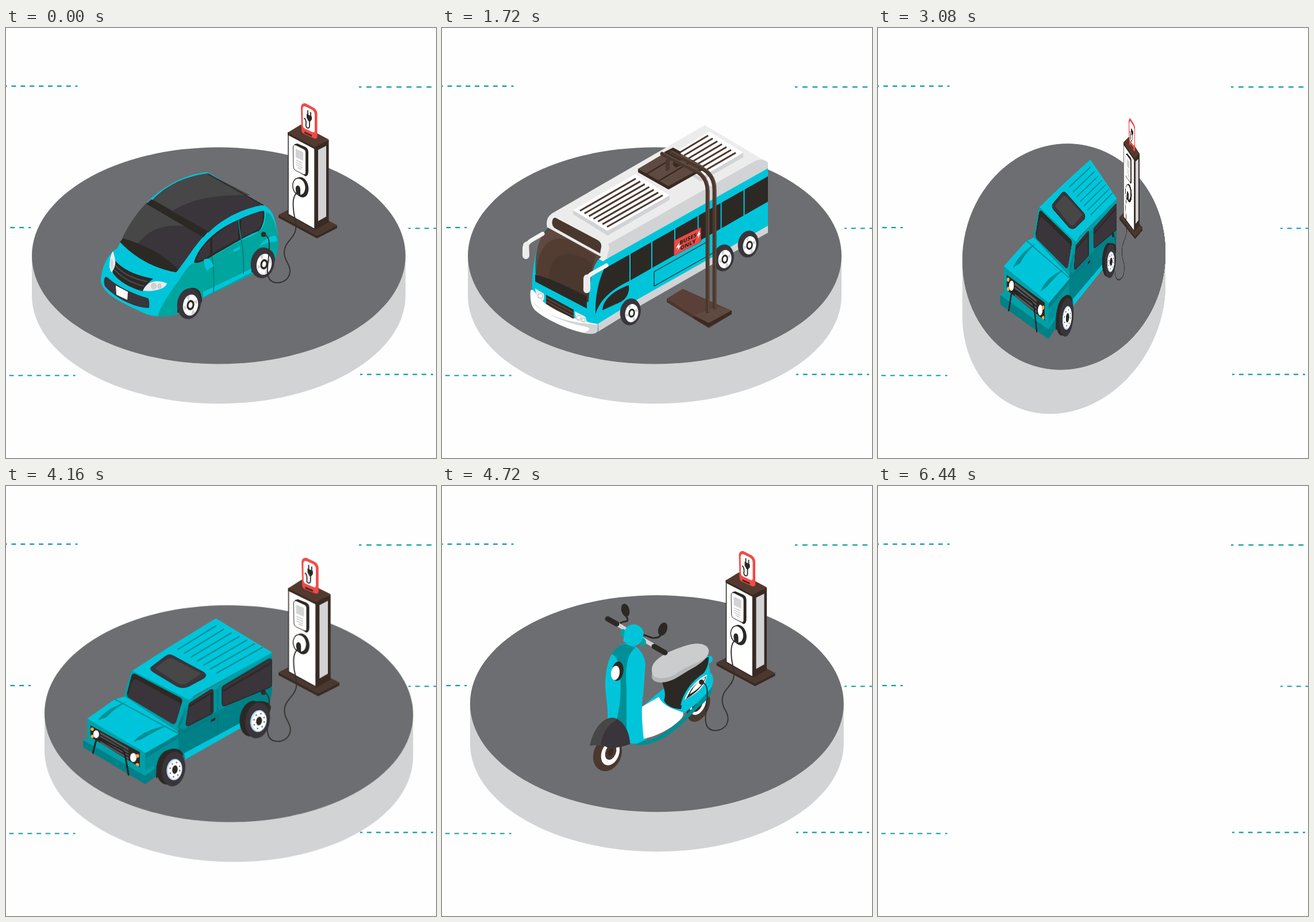
An HTML page for the animation above (6.48 s loop, 748x748 px).

```html
<!DOCTYPE html>
<html lang="en">
<head>
<meta charset="utf-8">
<title>Electric vehicles</title>
<style>
html, body { margin: 0; width: 100%; height: 100%; overflow: hidden; background: #fefefe; }
#view { position: fixed; inset: 0; overflow: hidden; contain: strict; }
svg { position: absolute; left: 0; top: 0; width: 748px; height: 748px; overflow: hidden; }
#stage { transform-origin: 374px 374px; }
.cy { fill: #00c5da } .te { fill: #00a59d } .dt { fill: #008f96 }
.jf { fill: #00a0a8 } .js { fill: #00929a } .jd { fill: #008087 }
.gl { fill: #3a343b } .gr { fill: #474747 } .bk { fill: #2c2925 }
.br { fill: #4a382f } .b2 { fill: #5f4a41 } .b3 { fill: #392a23 }
.wh { fill: #fff } .lg { fill: #ececec } .si { fill: #d2d3d5 } .rd { fill: #ef4b46 }
.ln { fill: none; stroke-linecap: round; stroke-linejoin: round }
</style>
</head>
<body>
<div id="view">
<svg id="stage" viewBox="0 0 748 748">
<defs>
  <g id="disc">
    <path class="si" d="M45 396V465A325 188.500 0 0 0 695 465V396Z"/>
    <ellipse cx="370" cy="396" rx="325" ry="188.500" fill="#6d6e71"/>
  </g>

  <g id="wheel">
    <ellipse class="gl" cx="-3" cy="-2" rx="20.500" ry="27" transform="rotate(10)"/>
    <ellipse class="wh" rx="13" ry="18.500" transform="rotate(10)"/>
    <path class="si" d="M-3-7L-8-14L-1-18ZM4-5L11-10L12-2ZM4 6L8 13L1 18ZM-4 4L-11 8L-12 1Z"/>
    <ellipse class="bk" rx="6.500" ry="9" transform="rotate(10)"/>
    <ellipse class="wh" rx="3.400" ry="5.200" transform="rotate(10)"/>
  </g>

  <g id="charger">
    <path class="b3" d="M474 325L541 361L576 343V348L541 366L474 330Z"/>
    <path class="br" d="M474 325L509 307L576 343L541 361Z"/>
    <path class="b3" d="M537 206L561.500 194V338L538 351Z"/>
    <path class="si" d="M543 212L557 205V328L543 336Z"/>
    <path class="wh" d="M491 182L537 206V350L491 324Z" stroke="#2c2925" stroke-width="1.500"/>
    <path d="M490 182L513 168L561.500 194L537.500 207Z" fill="#54392f"/>
    <path class="b3" d="M490 182L537.500 207V211L490 186Z"/>
    <path class="rd" d="M513 139Q513 130 521 131L536 139Q541.500 143 541.500 150V188Q541 194 536 192L518 184Q514 182 514 176Z"/>
    <path class="wh" d="M516 142Q516 134 522 137L532 142Q537 145 537 151V178Q537 183 533 181L520 175Q516.500 173 516.500 169Z"/>
    <path class="b3" d="M519 180L532 186V189L519 183Z"/>
    <path class="bk" d="M523 149L532 154V159L529 163L526 162L523 156Z"/>
    <path class="ln" stroke="#2c2925" stroke-width="1.800" d="M525 150V144M530 153V147M528 162V171Q527 176 523 173Q521 171 522 166Q522 159 519 157"/>
    <path class="bk" d="M502 202L507 201L521 207Q526 210 526 216V250Q526 257 521 258L503 246Z"/>
    <path class="wh" d="M499.500 207Q500 202 505 204L517 210Q521.500 212 521.500 217V251Q521 257 516 254L504 248Q500 246 500 241Z" stroke="#2c2925"/>
    <path class="si" d="M504 210L517 216V231L504 225Z"/>
    <path class="ln" stroke="#c4c5c7" stroke-width="1.500" d="M505 230L515 235M505 234L515 239M505 238L515 243M508 243L514 246"/>
    <ellipse class="bk" cx="514" cy="277" rx="12" ry="18" transform="rotate(-12 514 277)"/>
    <ellipse class="wh" cx="510" cy="276" rx="11" ry="15" transform="rotate(-12 510 276)" stroke="#2c2925" stroke-width="1.500"/>
    <path class="bk" d="M504 282Q503 274 508 274Q512 275 512 282V291L505 288Z"/>
    <circle class="bk" cx="448" cy="359" r="4.500"/>
    <path class="ln" stroke="#333130" stroke-width="1.900" d="M506 286C499 294 499 303 500 315C501 330 506 338 504 350C502 366 484 372 484 390C484 407 495 410 494 424C493 438 480 444 470 443C458 442 454 432 455 418C456 402 460 381 457 368Q455 361 448 359"/>
  </g>

  <g id="car">
    <path class="cy" d="M350 251C318 253 275 272 245 304C225 326 206 355 194 383C178 392 166 415 165 440C168 458 185 472 245 498C262 504 285 502 300 497L345 468L430 428L468 404C475 380 475 360 468 335C464 318 455 311 447 308L355 253Z"/>
    <path class="te" d="M264 502C268 485 285 460 300 440C310 425 320 409 328 409C350 406 380 384 408 370C425 362 441 358 449 342L453 320C462 322 469 340 473 360C475 375 473 390 468 404L430 428L345 468L300 497Q282 503 264 502Z"/>
    <path class="cy" d="M343 459L428 418V425L343 468ZM440 381C446 372 456 362 469 361L472 371C460 372 450 374 440 381Z"/>
    <path class="gl" d="M351 253L446 308C415 314 382 327 352 356L254 300C277 275 310 258 351 253Z"/>
    <path class="gr" d="M351 253L425 291C370 289 325 296 290 318L257 299C278 275 312 258 351 253Z"/>
    <path class="gl" d="M245 304L344 362C325 383 313 404 297 424C260 417 224 397 200 371C211 346 227 322 245 304Z"/>
    <path class="gr" d="M245 304L314 345C272 339 241 353 222 386L200 371C211 346 227 322 245 304Z"/>
    <path class="bk" d="M204 366C235 375 267 388 299 419L296 425C260 419 225 401 198 372ZM244 306L253 298L352 354L343 364Z"/>
    <path class="ln" stroke="#2c2925" stroke-width="2" d="M352 254L447 308"/>
    <path class="bk" d="M327 408C333 385 355 360 385 343C408 331 438 318 449 318C451 330 447 346 440 353C420 360 390 379 365 393C352 401 336 411 327 408Z"/>
    <path class="gl" d="M331 405C336 389 344 377 355 368V395C346 401 338 406 331 405ZM359 365C374 350 391 340 404 334V367L359 392ZM409 332C423 325 437 320 446 320C448 333 444 345 438 351L409 365Z"/>
    <path class="ln" stroke="#087f7e" stroke-width="1.800" d="M358 398C361 412 362 436 361 460M405 334C405 360 415 376 413 427"/>
    <path class="cy" d="M344 403Q352 398 358 407L361 414Q358 418 354 417L351 423L346 417ZM395 386L407 380V385L397 390Z"/>
    <path class="bk" d="M188 403C207 424 231 431 256 436C247 443 241 450 238 458C215 452 194 439 186 426Q184 413 188 403Z"/>
    <path class="ln" stroke="#4c4b4e" stroke-width="2" d="M190 413C205 430 225 437 245 441M189 421C205 437 222 445 240 449"/>
    <path class="lg" d="M238 457C245 442 259 436 280 444C278 454 258 459 238 457ZM180 416Q180 397 186 388Q191 403 190 411Q188 421 183 425Z"/>
    <path class="si" d="M183 401Q189 405 185 421Q180 414 183 401Z"/>
    <g class="si" stroke="#b9babc"><ellipse cx="257" cy="449" rx="4" ry="5"/><ellipse cx="267" cy="449" rx="3" ry="4"/></g>
    <path class="gl" d="M172 434Q174 431 179 436C195 450 222 463 247 470Q250 473 249 487C224 487 190 470 172 449Q169 441 172 434Z"/>
    <path class="wh" d="M191 448L212 459L211 473L192 464Z"/>
    <path class="bk" d="M298 495C298 469 309 455 322 452C336 451 341 462 341 475L330 500ZM427 425C427 402 438 386 451 384C463 383 468 395 468 405Z"/>
    <use href="#wheel" x="321" y="482"/><use href="#wheel" x="449" y="411"/>
  </g>

  <g id="bus">
    <path class="cy" d="M183 346L286 400L567 236V355L346 480L270 522L157 468C155 425 162 375 183 346Z"/>
    <path class="si" d="M567 344V356L345 483L272 528V514L342 471Z"/>
    <path class="lg" d="M183 347C180 334 185 326 194 321L457 169L567 234L302 383Q292 388 289 400L280 406Z"/>
    <path class="si" d="M567 234V244L286 402Q274 398 278 388Q283 378 296 372L545 231Q558 226 567 234Z"/>
    <path class="lg" d="M183 344C184 330 188 325 196 324L281 369Q295 376 289 390L286 402L273 399Z"/>
    <path class="br" d="M193 332Q196 328 201 332L271 369Q278 373 277 381L275 392L196 348Q189 342 193 332Z"/>
    <path class="b2" d="M184 347L277 398C265 408 258 425 255 477L163 429C161 395 166 367 184 347Z"/>
    <path fill="#533c32" d="M164 428C166 386 185 354 225 371L268 396C257 425 256 450 255 475Z"/>
    <path class="br" d="M185 441C186 408 200 384 237 396Q254 402 261 411C257 430 256 455 254 477Z"/>
    <path class="bk" d="M162 429C189 435 225 453 252 467V488L162 441Z"/>
    <path class="bk" d="M267 498C266 472 271 442 282 419L567 258V302L326 440C300 452 275 470 267 498ZM279 491C280 471 301 456 325 447C327 466 316 476 303 480Z"/>
    <path class="ln" stroke="#00c5da" stroke-width="2" d="M327 388V446M365 366V424M405 344V400M445.500 321V378M485.500 299V354M525.500 277V332"/>
    <path class="ln" stroke="#2c2925" stroke-width="1.300" d="M461 372L369 424V449L488 382"/>
    <path class="wh" d="M154 457Q156 453 162 460C175 483 220 506 271 515V527Q267 534 250 531C220 526 178 506 161 490Q152 480 154 457Z"/>
    <path class="si" d="M155 473C170 497 220 514 271 516V527Q264 535 245 530C258 527 259 522 252 520C214 513 173 496 155 473Z"/>
    <path class="b3" d="M181 464L229 490V506L181 480Z"/>
    <path class="ln" stroke="#6c564b" stroke-width="1.300" d="M182 470L228 495M182 476L228 501"/>
    <path class="lg" d="M162 453L177 462Q179 472 175 475Q164 472 162 453ZM231 493L249 502Q254 512 250 515L233 508Z"/>
    <g class="wh" stroke="#aeb0b2"><circle cx="171" cy="466" r="4"/><circle cx="238" cy="504" r="4"/><circle cx="246" cy="508" r="3"/></g>
    <path class="ln" stroke="#f4f4f4" stroke-width="7" d="M175 358L156 369Q147 374 147 382M286 413L263 426Q253 431 252 440"/>
    <path class="lg" d="M140 382Q141 370 151 371L152 396Q151 402 145 402Q139 400 140 393ZM246 436Q247 426 258 430V456Q256 462 250 461Q245 459 246 452Z"/>
    <g transform="translate(330 496) scale(.87)"><use href="#wheel"/></g>
    <g transform="translate(492 402) scale(.87)"><use href="#wheel"/></g>
    <g transform="translate(535 378) scale(.87)"><use href="#wheel"/></g>
    <path class="si" d="M228 317V324L288 361L396 299V291ZM392 224V231L450 267L524 225V217Z"/>
    <path class="wh" d="M228 317L336 254L396 291L288 353ZM392 224L465 180L524 217L450 260Z"/>
    <g id="slats" class="ln" stroke="#4a382f" stroke-width="3" style="stroke-linecap: butt"></g>
    <path class="b3" d="M341 245V251L394 281L456 246V240Z"/>
    <path class="b2" d="M341 245L400 210L456 241L394 275Z"/>
    <path class="ln" stroke="#392a23" stroke-width="2.500" d="M356 254L414 219M377 266L436 231"/>
    <path class="b3" d="M386 216L402 208L415 215V239L407 243L402 239V225Z"/>
    <path class="br" d="M389 229L396 226V247L389 249Z"/>
    <path class="br" d="M391 471L419 454L504 492V498L464 522L391 477Z"/>
    <path fill="#5a4036" d="M391 471L419 454L504 492L464 516Z"/>
    <path class="b3" d="M438 500V505L464 520L504 497V491L464 513Z"/>
    <path class="b2" d="M438 500L478 485L504 491L464 513Z"/>
    <path class="bk" d="M448 353L459 347V359L448 364Z"/>
    <path class="ln" stroke="#4a382f" stroke-width="7" d="M383 219L442 249Q462 260 462 284V493M398 216L455 246Q474 257 474 282V486"/>
    <path class="ln" stroke="#66503f" stroke-width="1.500" d="M385 217L443 247Q464 258 464 284V493M400 214L457 244Q476 255 476 282V486"/>
    <path class="rd" d="M404 370L450 347V372L404 396Z" stroke="#c53b38"/>
    <g transform="matrix(1 -.5 0 1 428 370)" font-family="Open Sans, sans-serif" font-weight="800" font-size="9.500" text-anchor="middle" fill="#2c2925">
      <text y="0">BUSES</text><text y="10">ONLY</text>
      <path class="wh" d="M-19 0L-15-4L-16 1L-12 1L-18 8L-17 3L-21 3ZM17-3L20-8L20-3L22-3L17 5L18 0L15 0Z"/>
    </g>
  </g>

  <g id="jeep">
    <path class="jd" d="M319 370L463 290V358L456 392L305 478L237 520V467L296 430Z"/>
    <path class="js" d="M319 370L463 290V342L371 390L306 424L298 420Z"/>
    <path class="ln" stroke="#00757c" stroke-width="1.500" d="M368 354V434M306 430L367 398"/>
    <path class="cy" d="M308 466L419 406V415L310 477Z"/>
    <path class="cy" d="M213 320L282 278L365 230L463 291L330 362Q322 366 319 376L213 324Z"/>
    <path class="jf" d="M213 320L317 372L463 291V296L319 379L208 327Z"/>
    <path class="jf" d="M211 320L319 374L298 421L295 430L197 367Z"/>
    <path class="jd" d="M319 375L311 384L296 420L299 422L308 402L311 385Z"/>
    <path class="gl" d="M212 328Q215 323 221 327L301 368Q306 371 304 377L294 410Q291 418 284 413L206 368Q202 365 204 359Z"/>
    <path class="bk" d="M212 328Q215 323 221 327L301 368Q306 371 304 377L302 382Q301 377 294 374L222 336Q215 333 212 341L205 363Q202 362 204 357Z"/>
    <path class="gl" d="M249 313L274 295Q281 290 288 294L342 323Q351 328 344 334L317 348Q306 353 295 348L251 322Q244 317 249 313Z" stroke="#2c2925"/>
    <path class="gr" d="M255 316L277 300Q282 297 289 300L339 326L313 343Q305 347 297 343Z"/>
    <g id="ribs" class="ln" stroke="#008f96" stroke-width="2.400"></g>
    <path class="cy" d="M128 406L180 371L199 366L295 427L298 432L237 468Z"/>
    <path class="dt" d="M148 409Q163 388 205 374Q176 390 165 403ZM215 447Q233 425 279 417Q250 430 231 442Z"/>
    <path class="ln" stroke="#008f96" stroke-width="2" d="M181 371L295 430"/>
    <path class="jf" d="M128 406L237 466V505L128 446Z"/>
    <path class="js" d="M237 467L298 432V459Q267 463 258 487L237 505Z"/>
    <path class="jd" d="M237 467L298 432V439L237 476Z"/>
    <path class="bk" d="M134 418L227 465V493L134 443Z"/>
    <path fill="#57565a" d="M153 430L206 459V479L153 450Z"/>
    <path class="ln" stroke="#222" stroke-width="2" d="M153 435L206 464M153 440L206 469M153 445L206 474"/>
    <g class="wh"><ellipse cx="145" cy="434" rx="5.500" ry="7"/><ellipse cx="215" cy="475" rx="6" ry="8"/></g>
    <g fill="#f2ad49"><circle cx="137.500" cy="425" r="3"/><circle cx="137.500" cy="438" r="3"/><circle cx="222.500" cy="472" r="3.300"/><circle cx="222.500" cy="488" r="3.300"/></g>
    <path class="jf" d="M120 445L134 439L237 498L254 488L256 494L237 508Z"/>
    <path class="jd" d="M120 445L237 507L256 493V508L237 522L120 458Z"/>
    <path class="ln" stroke="#25221f" stroke-width="3.200" d="M139 468L144 448Q146 440 154 443L191 460Q198 463 200 473L206 506"/>
    <path class="gl" d="M317 381Q318 377 323 375L355 355Q360 352 360 358V391Q360 395 356 397L317 417Q311 419 312 412ZM376 353Q376 349 380 347L456 303Q462 300 462 305V345Q462 349 458 351L382 382Q376 384 376 378Z" stroke="#2c2925" stroke-width="1.500"/>
    <path class="ln" stroke="#2c2925" stroke-width="3" d="M318 383L357 360V392M379 356L459 310"/>
    <path class="bk" d="M356 407L364 403V407L356 411Z"/>
    <path class="bk" d="M257 511C257 478 270 462 287 458Q303 457 306 468L300 490ZM412 425C412 392 423 377 440 374Q459 374 461 385L455 407Z"/>
    <g id="tyre">
      <ellipse class="bk" cx="279" cy="491" rx="21" ry="31" transform="rotate(10 279 491)"/>
      <ellipse class="gl" cx="289" cy="494" rx="21" ry="31" transform="rotate(10 289 494)"/>
      <ellipse cx="290.500" cy="495" rx="14" ry="19" transform="rotate(10 290.500 495)" fill="#b9def2"/>
      <ellipse class="wh" cx="291.500" cy="495" rx="12" ry="17" transform="rotate(10 291.500 495)"/>
      <ellipse class="ln" cx="291.500" cy="495" rx="9" ry="13" transform="rotate(10 291.500 495)" stroke="#55565a" stroke-width="2.500" stroke-dasharray=".1 8.700"/>
      <ellipse class="bk" cx="291.500" cy="495" rx="5" ry="7.500" transform="rotate(10 291.500 495)"/>
    </g>
    <use href="#tyre" x="149" y="-86.500"/>
  </g>

  <g id="scooter">
    <g transform="rotate(25 446 383)"><ellipse class="br" cx="446" cy="383" rx="18" ry="29"/><ellipse class="wh" cx="444" cy="380" rx="12" ry="20"/><ellipse class="b3" cx="443" cy="380" rx="8" ry="15"/></g>
    <path class="cy" d="M461 296Q471 293 471 302Q469 308 464 309L466 324Q474 330 471 344C466 363 446 376 428 390L340 450L347 385L382 355Z"/>
    <path class="bk" d="M382 338L464 297C464 323 450 331 435 346C421 360 418 374 416 388C402 388 390 382 386 373C391 361 385 350 382 338Z"/>
    <path class="dt" d="M328 445C370 446 388 430 418 405L470 350Q469 368 445 386L423 409C393 437 367 452 340 451Z"/>
    <path class="cy" d="M415 382C420 355 440 333 466 319C467 345 451 363 415 382Z"/>
    <path class="wh" d="M422 372C427 354 445 335 461 328C459 348 444 361 422 372Z"/>
    <path class="bk" d="M424 371L434 353Q447 338 460 331C455 348 442 360 424 371Z"/>
    <path class="wh" d="M431 362Q441 341 458 333Q454 349 431 362Z"/>
    <path class="wh" d="M346 385L377 367Q383 379 398 386L419 394Q422 399 414 407C396 424 374 435 350 440Z"/>
    <path fill="#b4b5b7" d="M365 328C370 309 430 283 464 285C466 299 446 312 427 322C410 332 400 341 381 342Q363 341 365 328Z"/>
    <path fill="#cbcccd" d="M365 319C365 299 402 284 430 276C456 270 468 281 463 292C456 307 427 311 410 325C398 335 363 342 365 319Z"/>
    <g transform="rotate(22 288 466)"><ellipse class="br" cx="288" cy="466" rx="24" ry="31"/><ellipse class="wh" cx="292" cy="463" rx="15" ry="22"/><ellipse class="br" cx="292" cy="461" rx="9" ry="14"/><ellipse class="b3" cx="292" cy="461" rx="4" ry="7"/></g>
    <path class="cy" d="M319 274C341 275 352 292 354 310L350 364Q345 390 351 440Q342 452 326 447L288 410C290 374 280 355 286 322C290 296 300 278 319 274Z"/>
    <path class="dt" d="M295 292Q304 276 320 275L337 281C320 292 319 323 321 350V430L304 406C312 375 312 338 308 318Q307 298 295 292Z"/>
    <ellipse class="bk" cx="305.500" cy="322" rx="10" ry="17" transform="rotate(8 305 322)"/>
    <ellipse class="wh" cx="301.500" cy="325" rx="7.500" ry="12.500" transform="rotate(8 301 325)"/>
    <path class="gr" d="M257 452C262 427 277 402 298 403C316 406 327 429 327 449Q307 456 290 456Q278 448 257 452Z"/>
    <path class="gl" d="M276 450C279 431 288 414 305 406Q325 418 327 449Q306 456 290 456Q282 450 276 450Z"/>
    <g class="ln">
      <path stroke="#2c2925" stroke-width="3" d="M319 225Q328 236 316 236L307 240M382 256Q379 266 365 264L351 259"/>
      <path stroke="#d2d3d5" stroke-width="7" d="M306 241L324 252M350 267L372 280"/>
      <path stroke="#2c2925" stroke-width="9" d="M288 231L304 240M369 279L388 290"/>
    </g>
    <ellipse class="bk" cx="319" cy="216" rx="7" ry="11.500" transform="rotate(-15 319 216)"/>
    <ellipse class="bk" cx="384" cy="249" rx="7.500" ry="12" transform="rotate(20 384 249)"/>
    <path class="te" d="M311 252Q314 246 319 251L320 264Q314 264 311 259ZM346 264Q354 263 355 272Q353 281 346 279Z"/>
    <path class="cy" d="M318 251Q324 239 337 241Q350 245 351 257L347 270Q339 281 326 276L315 270Z"/>
  </g>
</defs>
<g class="scene"><use href="#disc"/><use href="#car"/><use href="#charger"/></g>
<g class="scene"><use href="#disc"/><use href="#bus"/></g>
<g class="scene"><use href="#disc"/><use href="#jeep"/><use href="#charger"/></g>
<g class="scene"><use href="#disc" x="3.800" y="-17.500"/><use href="#scooter"/><use href="#charger" x="3.500" y="-17.800"/></g>
</svg>
<svg viewBox="0 0 748 748" fill="none" stroke="#0b9b9e" stroke-width="2.200" stroke-dasharray="7.930" stroke-dashoffset="3.960">
  <path d="M124.500 101.200H0M43 347.200H5M120.600 604.500H4M700 348.500H748M616 602.700H743"/>
  <path d="M614 102.600H742" stroke-dasharray="8.700" stroke-dashoffset="4.350"/>
</svg>
</div>
<script>
const LOOP = 6480, STEP = 40;
// turn-in start, turn-in end, turn-out start, turn-out end
const times = [
  [0, 0, 1240, 1480],
  [1480, 1720, 2640, 3000],
  [3000, 3240, 4120, 4480],
  [4480, 4720, 6120, 6440]
];
const stage = document.getElementById("stage");
const scenes = [...document.querySelectorAll(".scene")];

// n parallel lines, interpolated between the first and the last one
function lines(id, n, a, b) {
  let d = "";
  for (let i = 0; i < n; i++) {
    const p = a.map((v, k) => v + (b[k] - v) * i / (n - 1));
    d += `M${p[0]} ${p[1]}L${p[2]} ${p[3]}`;
  }
  document.getElementById(id).innerHTML += `<path d="${d}"/>`;
}
lines("slats", 7, [240, 318, 337, 262], [287, 346, 384, 291]);
lines("slats", 7, [413, 217, 463, 187], [461, 246, 511, 217]);
lines("ribs", 7, [297, 283, 365, 243], [367, 325, 446, 282]);

function angle([a, b, c, d], t) {
  if (t < b) return 90 * (b - t) / (b - a);
  return t > c ? -90 * (t - c) / (d - c) : 0;
}

function draw(ms) {
  const t = Math.floor(ms % LOOP / STEP) * STEP;
  const now = times.findIndex(([a, , , d]) => t >= a && t < d);
  scenes.forEach((s, i) => s.style.display = i === now ? "" : "none");
  const turn = now < 0 ? 0 : angle(times[now], t);
  stage.style.transform = turn ? `perspective(1030px) rotateY(${turn}deg)` : "none";
}

const start = performance.now();
function tick() {
  draw(performance.now() - start);
  requestAnimationFrame(tick);
}
tick();
</script>
</body>
</html>
```
